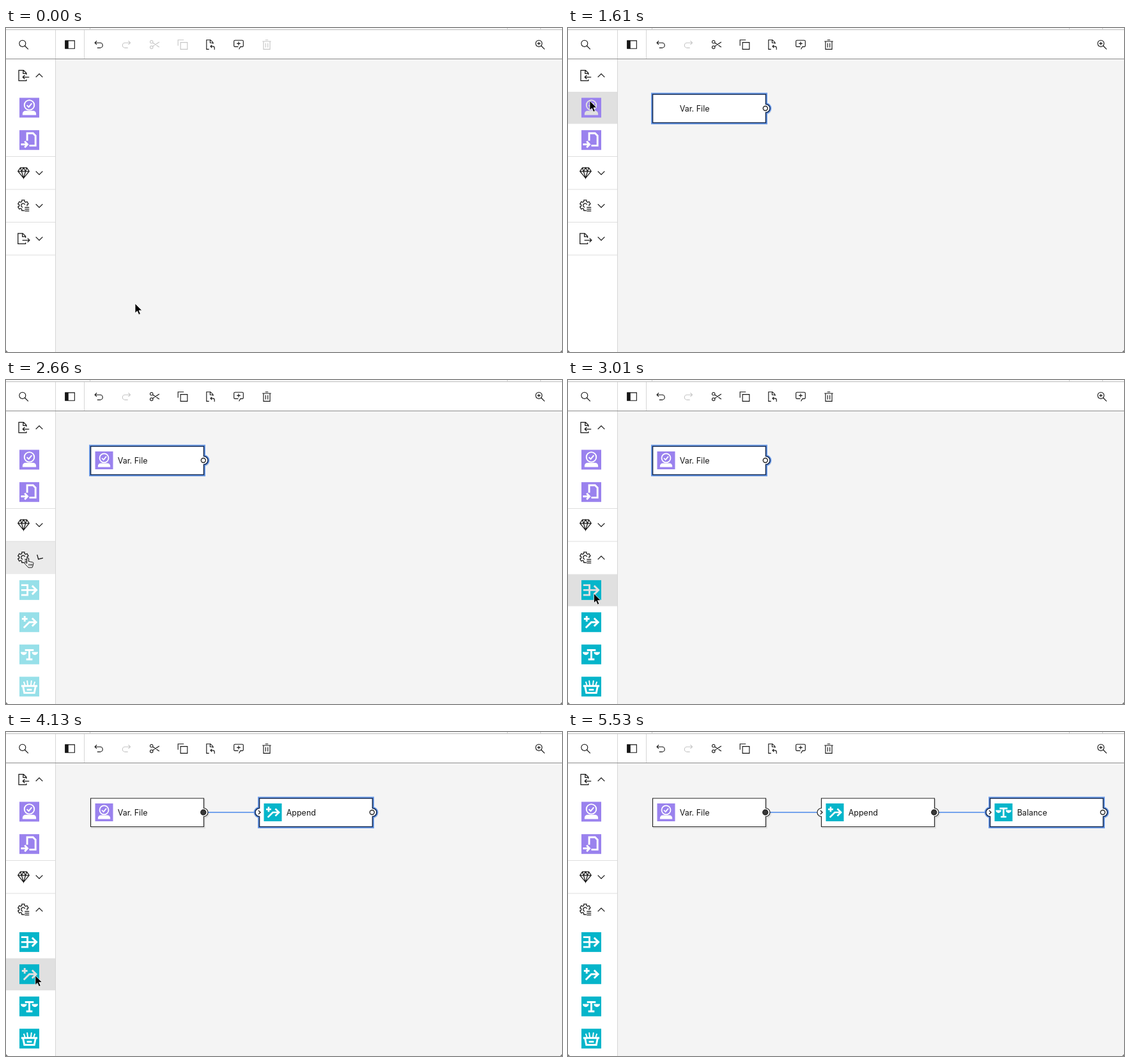
An HTML page that plays this animation: 870 px wide and 508 px high, repeating every 6.3 s.

```html
<!DOCTYPE html>
<html lang="en">
<head>
<meta charset="utf-8">
<title>Building a flow</title>
<style>
html, body { margin: 0; width: 100%; height: 100%; overflow: hidden; background: #f4f4f4; }
svg { display: block; }
text { font: 12.5px Inter, "Open Sans", sans-serif; fill: #161616; }
.line { fill: none; stroke: #161616; stroke-width: 2; }
.off .line { stroke: #c6c6c6; }
.off .solid { fill: #c6c6c6; }
.solid { fill: #161616; }
.glyph { fill: none; stroke: currentColor; stroke-width: 3; }
.fill { fill: currentColor; }
.tip text { fill: #f4f4f4; }
.tip .small { font-size: 10.5px; }
.tip .bold { font-weight: 600; fill: #fff; }
</style>
</head>
<body>
<svg id="stage" width="870" height="508" viewBox="0 0 870 508"></svg>
<script>
const LOOP = 6300, STEP = 70;
const PURPLE = '#9a82ee', TEAL = '#05b5ca';

const line = d => `<path class="line" d="${d}"/>`;
const solid = d => `<path class="solid" d="${d}"/>`;
const glyph = d => `<path class="glyph" d="${d}"/>`;
const fill = d => `<path class="fill" d="${d}"/>`;

// Cog outline, left open at the lower right for the list lines
function cog() {
  const points = [];
  for (let tooth = 0; tooth < 5; tooth++) {
    for (const [a, r] of [[-14, 13.5], [14, 13.5], [21, 10], [39, 10]]) {
      const angle = (90 + tooth * 60 + a) * Math.PI / 180;
      points.push((15 + r * Math.cos(angle)).toFixed(1) + ' ' + (15 + r * Math.sin(angle)).toFixed(1));
    }
  }
  return 'M' + points.join('L');
}

// All icons live on a 32-unit grid
const lens = 'M13 4a9 9 0 1 0 .01 0M20 20L29 29';
const page = 'M23 14V10L16 3H4V29H23V25M15 3V11H23';
const undo = 'M20 10H7.8l3.6-3.6L10 5l-6 6 6 6 1.4-1.4L7.8 12H20a6 6 0 0 1 0 12H12v2h8a8 8 0 0 0 0-16z';
const icons = {
  search: line(lens),
  zoom: line(lens + 'M13 8.5V17.5M8.5 13H17.5'),
  panel: line('M3 5H29V27H3z') + solid('M3 5H12V27H3z'),
  undo: solid(undo),
  redo: `<g transform="matrix(-1 0 0 1 32 0)">${solid(undo)}</g>`,
  cut: line('M7.5 4.5a4 4 0 1 0 .01 0M7.5 19.5a4 4 0 1 0 .01 0M11 11L29 23M11 21L29 9'),
  copy: line('M10 10H29V29H10zM3 19V3H19'),
  paste: line('M12 29H5V3H16L23 10V14M15 3V11H23M27 30V25a4 4 0 0 0-4-4H16M20 17l-4 4 4 4'),
  note: line('M17 29l4-7h5a3 3 0 0 0 3-3V7a3 3 0 0 0-3-3H6a3 3 0 0 0-3 3V19a3 3 0 0 0 3 3H15M16 8V18M11 13H21'),
  trash: line('M4 7H28M7 7V29H25V7M13 12V24M19 12V24M12 3H20'),
  input: line('M23 14V10L16 3H4V29H23V26M15 3V11H23M30 20H14M19 15l-5 5 5 5'),
  gem: line('M8 3H24L30 12 16 29 2 12zM2 12H30M11 12L16 29 21 12M8 3L11 12 16 3 21 12 24 3'),
  ops: line(cog() + 'M14 20A5 5 0 1 1 19.5 13M19 20H30M19 24.5H30M19 29H30'),
  output: line('M21 14V10L14 3H2V29H21V26M13 3V11H21M13 20H31M26 15l5 5-5 5'),
  varFile: fill('M5 28V26a5 5 0 0 1 5-5H22a5 5 0 0 1 5 5V28z') +
    '<circle class="glyph" cx="16" cy="11.8" r="8" style="stroke-width:2"/>' +
    '<path class="glyph" style="stroke-width:2" d="M12 12l3 3 5-6"/>',
  importFile: glyph('M12.5 17V5H22L26 9V25H16M2.5 23H12M8.5 18l4.5 5-4.5 5'),
  merge: glyph('M3 8H13V24H3M3 16H27M20.5 9l7 7-7 7'),
  append: glyph('M4 10.5H13M8.5 6V15M7 25L16 16H26M20.5 9.5l6.5 6.5-6.5 6.5'),
  balance: fill('M2 12H12a5 5 0 0 1-10 0zM20 12H30a5 5 0 0 1-10 0z') +
    glyph('M9 9H23M16 9V24M11 24H21'),
  basket: glyph('M3 15H29M6 16L8 26H24L26 16M12 21H20') +
    '<path class="glyph" style="stroke-width:2" d="M7 8l2 6M12.5 6l1 8M19.5 6l-1 8M25 8l-2 6"/>'
};

const icon = (name, cx, cy, size, attrs = '') =>
  `<g ${attrs} transform="translate(${cx - size / 2} ${cy - size / 2}) scale(${size / 32})">${icons[name]}</g>`;

const tile = (name, colour, cx, cy, size, attrs = '') =>
  `<g ${attrs}><rect x="${cx - size / 2}" y="${cy - size / 2}" width="${size}" height="${size}" fill="${colour}"/>` +
  icon(name, cx, cy, size) + '</g>';

// Palette rows; "when" tells whether the row needs the third group closed or open
const rows = [
  { y: 49, h: 51, name: 'input', open: true },
  { y: 100, h: 50.5, name: 'varFile', colour: PURPLE },
  { y: 150.5, h: 51, name: 'importFile', colour: PURPLE },
  { y: 201.5, h: 51.5, name: 'gem', border: true },
  { y: 253, h: 51.5, name: 'ops', border: true },
  { y: 304.5, h: 51.5, name: 'output', border: true, when: 'closed' },
  { y: 304.5, h: 50.3, name: 'merge', colour: TEAL, when: 'open' },
  { y: 354.8, h: 50.5, name: 'append', colour: TEAL, when: 'open' },
  { y: 405.3, h: 50.5, name: 'balance', colour: TEAL, when: 'open' },
  { y: 455.8, h: 50.5, name: 'basket', colour: TEAL, when: 'open' }
];

function rowMarkup({ y, h, name, colour, open, border }) {
  const cy = y + h / 2;
  const content = colour
    ? tile(name, colour, 36.5, cy - .3, 31, 'class="tile"')
    : icon(name, 27.5, cy, 20) +
      `<path class="line chevron" style="stroke-width:1.3" d="M-5.3-2.6L0 2.6 5.3-2.6" transform="translate(52 ${cy}) rotate(${open ? 180 : 0})"/>`;
  const edge = border ? `<path d="M0 ${y}H77" stroke="#dedede"/>` : '';
  return `<g class="row"><rect class="fill" y="${y}" width="77" height="${h}"/>${content}${edge}</g>`;
}

function nodeMarkup(id, x, name, label, colour, hasInput) {
  const inlet = hasInput ? 'V28.5A6.5 6.5 0 0 1 0 15.5' : '';
  const shape = `M0 0H177V15.5A6.5 6.5 0 0 1 177 28.5V44.5H0${inlet}Z`;
  return `<g id="${id}" transform="translate(${x} 104)" color="#fff">
    <path d="${shape}" fill="#000" opacity=".07" transform="translate(1.5 2)" stroke="#000" stroke-width="2"/>
    <path class="halo" d="${shape}" fill="none" stroke="#6d9deb" stroke-width="5"/>
    <path class="body" d="${shape}" fill="#fff"/>
    ${hasInput ? '<path class="line" style="stroke-width:1.3" d="M-1.5 19l3 3-3 3"/>' : ''}
    ${tile(name, colour, 21, 22, 28, 'class="tile"')}
    <text x="42.2" y="26.5">${label}</text>
    <circle class="port" cx="176.3" cy="22" stroke="#262626" stroke-width="1.4"/>
  </g>`;
}

const tipMarkup = (id, label, y) => `<g id="${id}" class="tip" transform="translate(88 ${y})">
  <path d="M2 0H123.5a2 2 0 0 1 2 2V88.700a2 2 0 0 1-2 2H2a2 2 0 0 1-2-2V51.500L-6 45.500 0 39.500V2a2 2 0 0 1 2-2z" fill="#393939"/>
  <text class="small" x="19" y="28.500">OPERATIONS</text>
  <text class="bold" x="19" y="48.500">${label}</text>
  <text x="19" y="69">${label} data</text></g>`;

const tool = (name, x, attrs) => icon(name, x, 26, 18, attrs);
const stage = document.getElementById('stage');
stage.innerHTML = `
  <rect width="870" height="508" fill="#f4f4f4"/>
  <rect width="870" height="48" fill="#fff"/>
  <path d="M0 2.500H870" stroke="#c9c9c9" stroke-width="1.500"/>
  <path d="M131.500 0V2M784.500 0V2M836.500 0V2" stroke="#ccc"/>
  <rect y="49" width="77" height="459" fill="#fff"/>
  ${rows.map(rowMarkup).join('')}
  <path id="lastEdge" d="M0 356H77" stroke="#dedede"/>
  <path d="M77.500 3V508M122.500 3V48" stroke="#d6d6d6"/>
  <path d="M0 48.500H870" stroke="#8d8d8d"/>
  <rect id="ring" x="79.200" y="5.200" width="41.800" height="41.800" fill="#eef0ef" stroke="#1f67de" stroke-width="2.400"/>
  ${tool('search', 27.5)}${tool('panel', 100)}${tool('undo', 145)}${tool('redo', 188.5, 'class="off"')}
  ${tool('cut', 232.5, 'class="edit"')}${tool('copy', 276.5, 'class="edit"')}${tool('paste', 320)}
  ${tool('note', 364)}${tool('trash', 408, 'class="edit"')}${tool('zoom', 835.5)}
  <path id="link1" d="M316 126H390" stroke="#74a3ec" stroke-width="2"/>
  <path id="link2" d="M580 126H654" stroke="#74a3ec" stroke-width="2"/>
  ${nodeMarkup('node1', 132.5, 'varFile', 'Var. File', PURPLE, false)}
  ${nodeMarkup('node2', 396.5, 'append', 'Append', TEAL, true)}
  ${nodeMarkup('node3', 660.5, 'balance', 'Balance', TEAL, true)}
  ${tipMarkup('tip1', 'Append', 335.5)}
  ${tipMarkup('tip2', 'Balance', 386)}
  <path d="M0 505V508H3zM870 505V508H867z" fill="#777"/>
  <g id="cursor">
    <path id="arrow" d="M0 0V15l3.400-3.200 2.400 5.600 2.600-1.100-2.400-5.400h4.800z" stroke="#fff" stroke-width=".8"/>
    <path id="hand" d="M-1.200 1a1.300 1.300 0 0 1 2.600 0V5.500l6.300 1.300a1.500 1.500 0 0 1 1.200 1.700l-.8 4-1.200 2.500H1L-4.700 8.800a1.300 1.300 0 0 1 1.800-1.500l1.700 1.400zM2 9v3.500M4.300 9v3.500M6.500 9v3.500" fill="#fff" stroke="#111"/>
  </g>`;

const $ = id => document.getElementById(id);
const show = (el, on) => el.style.display = on ? '' : 'none';
const rowEls = [...stage.querySelectorAll('.row')];
const editEls = stage.querySelectorAll('.edit');

const OPEN = 2590;
const added = [1610, 3780, 4970];
const path = [
  [0, 202, 432], [70, 188, 420], [140, 176, 410], [210, 190, 428], [280, 190, 428],
  [770, 30, 105], [980, 31, 109], [1050, 31, 109], [1120, 32, 112], [1190, 32, 112],
  [1470, 34, 114], [1750, 34, 114], [2380, 34, 279], [2800, 34, 279], [3150, 44, 365],
  [3500, 46, 379], [4060, 46, 379], [4620, 41, 441], [LOOP, 41, 441]
];

function pointer(t) {
  const i = path.findIndex(key => key[0] > t);
  const [t0, x0, y0] = path[i - 1], [t1, x1, y1] = path[i];
  const p = (t - t0) / (t1 - t0), e = p * p * (3 - 2 * p);
  return [x0 + (x1 - x0) * e, y0 + (y1 - y0) * e];
}

function drawPalette(t, x, y, active) {
  const group = t >= OPEN ? 'open' : 'closed';
  const p = Math.max(0, Math.min(1, (t - OPEN) / 170));
  let overGroup = false;
  rows.forEach((row, i) => {
    const el = rowEls[i], visible = !row.when || row.when === group;
    const over = visible && active && x < 77 && y >= row.y && y < row.y + row.h;
    show(el, visible);
    el.style.color = !over ? '#fff' : row.colour ? '#e0e0e0' : '#ebebeb';
    if (over && !row.colour) overGroup = true;
    if (row.when === 'open') el.querySelector('.tile').style.opacity = p;
    if (row.name === 'ops')
      el.querySelector('.chevron').setAttribute('transform', `translate(52 ${row.y + row.h / 2}) rotate(${180 * p * p})`);
  });
  show($('lastEdge'), group === 'closed');
  return overGroup;
}

function drawNodes(t) {
  added.forEach((time, i) => {
    const node = $('node' + (i + 1)), linked = t >= added[i + 1];
    show(node, t >= time);
    show(node.querySelector('.halo'), !linked);
    const body = node.querySelector('.body'), port = node.querySelector('.port');
    body.setAttribute('stroke', linked ? '#262626' : '#172d55');
    body.setAttribute('stroke-width', linked ? 1.2 : 1.6);
    port.setAttribute('r', linked ? 4 : 3.5);
    port.setAttribute('fill', linked ? '#393939' : '#fff');
    if (i) show($('link' + i), t >= time);
  });
  show($('node1').querySelector('.tile'), t >= 1820);
}

function draw(t) {
  const [x, y] = pointer(t), active = t < 5460;
  const overGroup = drawPalette(t, x, y, active);
  drawNodes(t);
  show($('ring'), t >= 350 && t < 1330);
  editEls.forEach(el => el.classList.toggle('off', t < added[0]));
  show($('tip1'), t >= 3220 && t < added[1]);
  show($('tip2'), t >= 4480 && t < added[2]);
  show($('cursor'), active);
  show($('hand'), overGroup);
  show($('arrow'), !overGroup);
  $('cursor').setAttribute('transform', `translate(${x} ${y})`);
}

const start = performance.now();
function frame() {
  const t = (performance.now() - start) % LOOP;
  draw(Math.floor(t / STEP) * STEP);
  requestAnimationFrame(frame);
}
frame();
</script>
</body>
</html>
```
